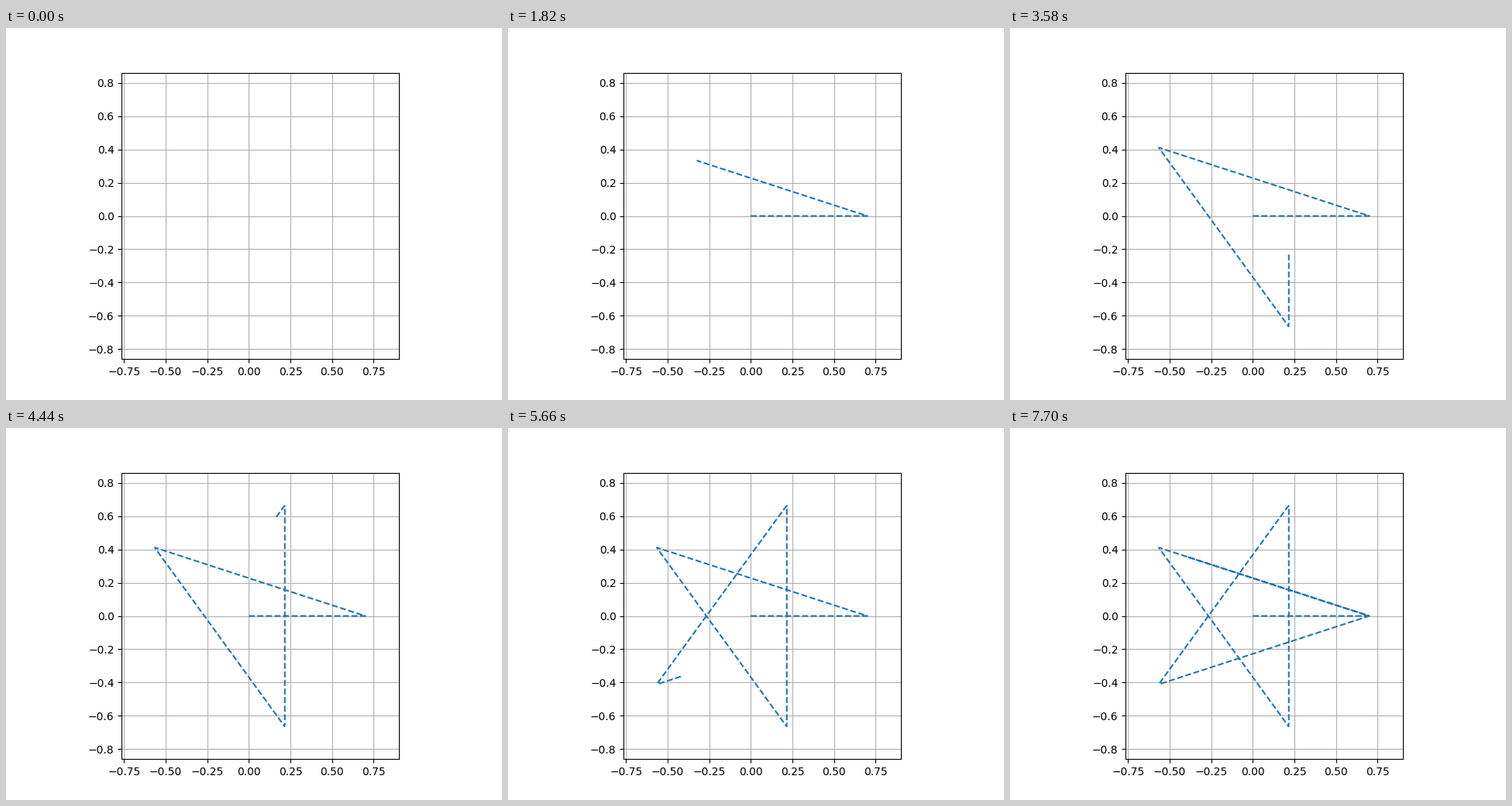
Animation of 640 by 480 pixels, one loop 7720 ms. Source, as a matplotlib script:

```python
import numpy as np
import matplotlib.pyplot as plt
from matplotlib.animation import FuncAnimation

FRAMES = 386
INTERVAL = 20      # ms
RADIUS = 0.7
LEAD_IN = 43       # steps from the centre to the first tip
EDGE = 58.05       # steps along each edge of the star

# Centre, then every second corner of a pentagon, running past the full star
angles = np.arange(7) * 2 * np.radians(72)
corner_x = np.append(0, RADIUS * np.cos(angles))
corner_y = np.append(0, RADIUS * np.sin(angles))
corner_t = np.append(0, LEAD_IN + EDGE * np.arange(7))

steps = np.arange(FRAMES)
path_x = np.interp(steps, corner_t, corner_x)
path_y = np.interp(steps, corner_t, corner_y)

fig, ax = plt.subplots(figsize=(6.4, 4.8), dpi=100)
ax.set_aspect("equal")
ax.set_xlim(-0.7645, 0.9011)
ax.set_ylim(-0.8605, 0.8617)
ax.grid()
trace, = ax.plot([], [], "--")


def init():
    trace.set_data([], [])
    return trace,


def update(i):
    trace.set_data(path_x[:i], path_y[:i])
    return trace,


anim = FuncAnimation(fig, update, frames=FRAMES, init_func=init,
                     interval=INTERVAL, repeat=True)
plt.show()
```
